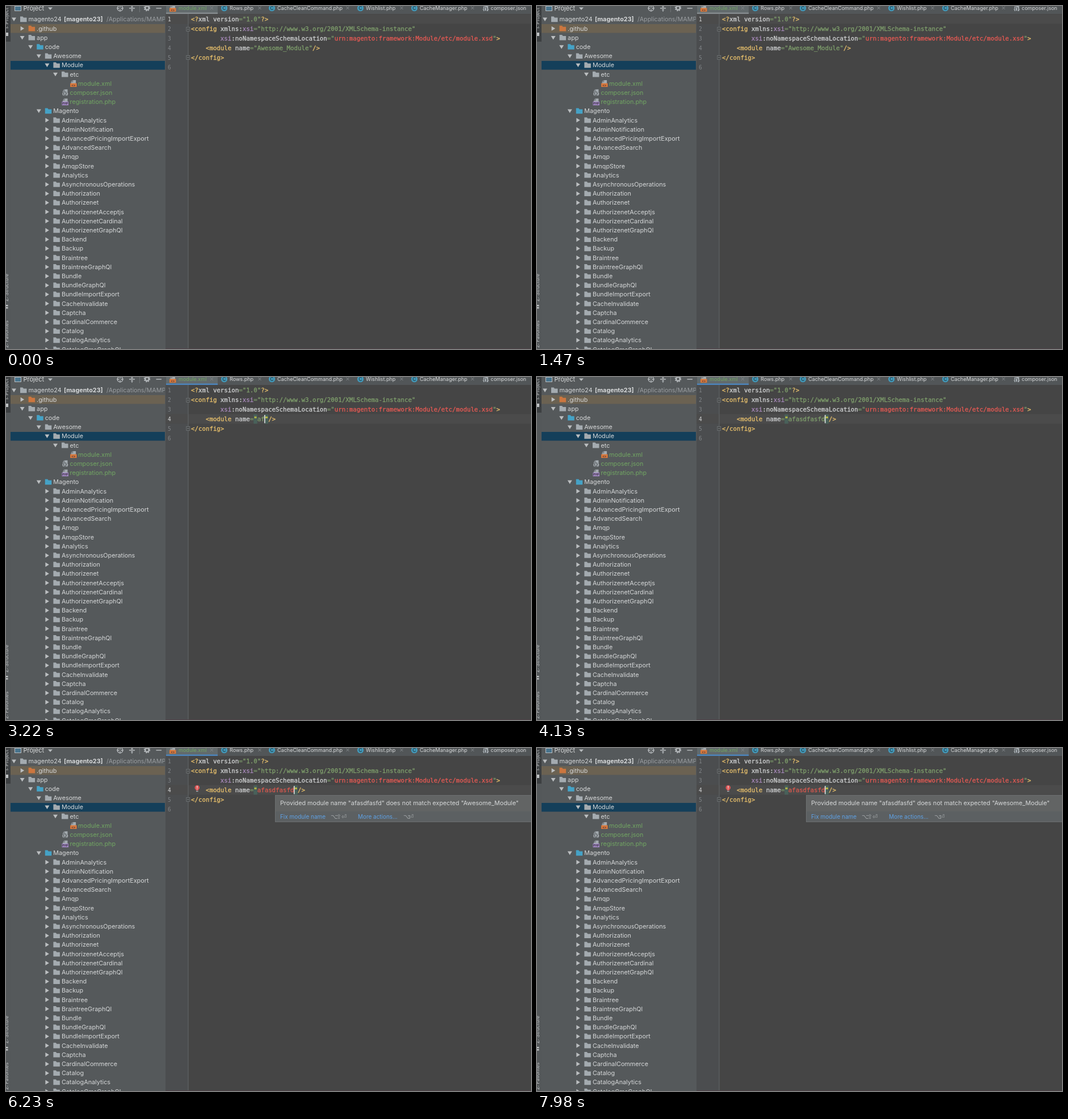
Animation, 925 px wide and 606 px high, one loop 8000 ms. Source, as an HTML page:

```html
<!DOCTYPE html>
<html lang="en">
<head>
<meta charset="utf-8">
<title>Module name inspection</title>
<style>
  html, body { margin: 0; width: 100%; height: 100%; overflow: hidden; background: #454545; }
  svg { display: block; width: 925px; height: 606px; }
  text { white-space: pre; font-family: Inter, "Open Sans", sans-serif; font-size: 10.8px; fill: #d6d8d9; }
  .code { font-family: "DejaVu Sans Mono", "Noto Sans Mono", monospace; font-size: 10.77px;
          fill: currentColor; stroke: currentColor; stroke-width: .3px; }
  .num { font-family: "DejaVu Sans Mono", monospace; font-size: 9.6px; fill: #7f8386; }
  .tab { font-size: 9.05px; }
  .side { font-size: 8.8px; fill: #c0c3c5; }
  .keys { font-family: "DejaVu Sans", sans-serif; font-size: 11px; fill: #a2a6a8; }
  .link { font-size: 9.95px; fill: #5fa2e6; }
</style>
</head>
<body>
<svg id="stage" viewBox="0 0 925 606"></svg>
<script>
const LOOP = 8000, SELECT = 1960, TYPE = 3080, KEY = 80, ERROR = 4410, POPUP = 5600;
const TYPED = 'afasdfasfd', NAME = 'Awesome_Module';
const COL = 6.483, LEFT = 326;
const C = { tag: '#e8c06c', attr: '#d0d2d3', ns: '#a88abb', str: '#7f9f6c', red: '#e75a54',
            match: '#f5e93a', gray: '#a4abb0', blue: '#45a2c6', orange: '#cb763f', green: '#72a763' };

const esc = s => s.replace(/&/g, '&amp;').replace(/</g, '&lt;');
const rect = (x, y, w, h, fill, more = '') => `<rect x="${x}" y="${y}" width="${w}" height="${h}" fill="${fill}" ${more}/>`;
const path = (d, fill, more = '') => `<path d="${d}" fill="${fill}" ${more}/>`;
const line = (d, color, width = 1) => path(d, 'none', `stroke="${color}" stroke-width="${width}"`);
const text = (x, y, s, more = '') => `<text x="${x}" y="${y}" ${more}>${esc(s)}</text>`;
const colX = col => LEFT + col * COL;
const lineY = n => 10 + n * 17;

// Each run is [text, colour], placed on the character grid.
function code(n, col, runs) {
  return runs.map(([s, color]) => {
    const out = text(colX(col), lineY(n), s, `class="code" style="color:${color}"`);
    col += s.length;
    return out;
  }).join('');
}

function folder(x, y, color) {
  return path(`M${x} ${y - 5}h4.5l1.5 2h5.5v7.6h-11.5z`, color);
}

function fileIcon(x, y, kind) {
  const page = path(`M${x + 4} ${y - 6}h6v11h-8.5v-8z`, '#a4abb0') + line(`M${x + 1.5} ${y - 3}h3v-3`, '#666b6e');
  if (kind === 'json')
    return page + text(x + 1.6, y + 4, '{}', 'style="font-size:8px;font-weight:700;fill:#44484a"')
      + line(`M${x + .5} ${y + 2}h2M${x + 9} ${y + 2}h2`, '#c5c9cc');
  const [color, label] = kind === 'xml' ? ['#d9783b', '<>'] : ['#a68ac9', 'PHP'];
  return page + rect(x, y - .5, 11.5, 6.5, color)
    + text(x + 5.7, y + 4.8, label, 'text-anchor="middle" style="font-size:5.2px;font-weight:700;fill:#3b3540"');
}

function arrow(x, y, open) {
  return path(open ? `M${x - 4} ${y - 3}h8l-4 6.5z` : `M${x - 3} ${y - 4}l6.5 4l-6.5 4z`, '#bbbec0');
}

function treeRow(i, depth, name, kind) {
  const y = 23.6 + i * 16.2, shift = depth * 14.6;
  const isFile = ['xml', 'json', 'php'].includes(kind);
  const open = kind !== 'closed' && name !== '.github';
  const color = { blue: C.blue, orange: C.orange }[kind] || C.gray;
  const icon = isFile ? fileIcon(25.5 + shift, y, kind) : folder(25 + shift, y, color);
  return (isFile ? '' : arrow(14 + shift, y, open)) + icon
    + text(39.5 + shift, y + 3.8, name, isFile ? `style="fill:${C.green}"` : '');
}

function sidebar() {
  const head = [[0, 'magento24'], [1, '.github', 'orange'], [1, 'app'], [2, 'code', 'blue'], [3, 'Awesome'],
    [4, 'Module'], [5, 'etc'], [6, 'module.xml', 'xml'], [5, 'composer.json', 'json'],
    [5, 'registration.php', 'php'], [3, 'Magento', 'blue']];
  const modules = ('AdminAnalytics AdminNotification AdvancedPricingImportExport AdvancedSearch Amqp AmqpStore '
    + 'Analytics AsynchronousOperations Authorization Authorizenet AuthorizenetAcceptjs AuthorizenetCardinal '
    + 'AuthorizenetGraphQl Backend Backup Braintree BraintreeGraphQl Bundle BundleGraphQl BundleImportExport '
    + 'CacheInvalidate Captcha CardinalCommerce Catalog CatalogAnalytics CatalogCmsGraphQl').split(' ');
  const rows = head.concat(modules.map(m => [4, m, 'closed']));
  return rect(0, 0, 281, 606, '#55595b')
    + rect(8, 32, 272, 15.5, '#6b6252') + rect(8, 97, 272, 15.5, '#143f5a')
    + rows.map(([depth, name, kind], i) => treeRow(i, depth, name, kind)).join('')
    + text(102, 27.4, '[magento23]', 'font-weight="700"')
    + text(177, 27.4, '/Applications/MAMP', 'clip-path="url(#tree)" style="fill:#9a9da0"');
}

function header() {
  const c = '#b9bdc0';
  return rect(15.5, -1, 11, 9.5, '#47738c', `stroke="${c}"`) + rect(15, -2, 12, 3, c)
    + text(30.5, 7.6, 'Project', 'style="font-size:11px"') + path('M74 2.5h8l-4 4.5z', c)
    + `<circle cx="201" cy="4" r="4.8" fill="none" stroke="${c}" stroke-width="1.3"/>`
    + line('M201-1v3.5M201 5.5v4M195.5 4h4M202.5 4h4', c, 1.3)
    + line('M217 4h10M222-1v3M222 6v4', c, 1.3) + path('M219.5 1h5l-2.5 2zM219.5 7.2h5l-2.5-2z', c)
    + line('M235.5 0v11', '#6e7274')
    + `<circle cx="248.5" cy="3.5" r="3.3" fill="none" stroke="${c}" stroke-width="2.2"/>`
    + `<circle cx="248.5" cy="3.5" r="4.9" fill="none" stroke="${c}" stroke-width="1.6" stroke-dasharray="2 1.85"/>`
    + line('M264.5 4h9.5', c, 1.4);
}

function toolStrip() {
  const label = (y, s) => text(0, 0, s, `class="side" transform="translate(4 ${y}) rotate(-90)"`);
  return rect(0, 0, 8, 606, '#54585a') + rect(0, 0, 8, 63, '#3d4042')
    + label(41, '1: Project') + rect(0, 47, 4, 6, '#bfc2c4')
    + label(522, 'Z: Structure') + rect(0, 528, 3.5, 2.5, '#bfc2c4') + rect(0, 532, 3.5, 2.5, '#bfc2c4')
    + label(604, '2: Favorites');
}

function tabs() {
  const list = [[394, 'Rows.php', 447], [478, 'CacheCleanCommand.php', 602], [634, 'Wishlist.php', 697], [729, 'CacheManager.php', 822]];
  const cross = x => line(`M${x - 2.5} 1l5 5m0-5l-5 5`, '#858a8d');
  return rect(281, 0, 644, 14, '#525658') + rect(282, 0, 91, 14, '#626a6c')
    + rect(282, 11.5, 91, 2.5, '#858b8e', 'id="underline"')
    + fileIcon(288, 4, 'xml') + text(304, 6.8, 'module.xml', `class="tab" style="fill:${C.green}"`) + cross(362.5)
    + list.map(([x, name, close]) => `<circle cx="${x - 9.5}" cy="3.7" r="5.6" fill="#4299ba"/>`
      + text(x - 9.5, 6.9, 'C', 'text-anchor="middle" style="font-size:8.5px;font-weight:600;fill:#27434f"')
      + text(x, 6.8, name, 'class="tab"') + cross(close)).join('')
    + fileIcon(839.5, 4, 'json') + text(854, 6.8, 'composer.json', 'class="tab"');
}

function editor() {
  const fold = y => rect(317.8, y - 3.5, 6, 7, '#484a4b', 'stroke="#74787a" stroke-width=".8"') + line(`M319.3 ${y}h3`, '#8c9092', .9);
  const nums = [1, 2, 3, 4, 5, 6].map(n => text(285, lineY(n), String(n), `class="num" id="num${n}"`)).join('');
  return rect(281, 14, 644, 592, '#454545') + rect(281, 14, 40, 592, '#4b4d4f')
    + rect(281, 0, 644, 17, '#4b4b4b', 'id="current"')
    + line('M321 14v592', '#65686a') + fold(41) + fold(91) + nums
    + code(1, 0, [['<?', C.tag], ['xml version', C.attr], ['="1.0"', C.str], ['?>', C.tag]])
    + code(2, 0, [['<config ', C.tag], ['xmlns:', C.attr], ['xsi', C.ns], ['="http://www.w3.org/2001/XMLSchema-instance"', C.str]])
    + code(3, 8, [['xsi', C.ns], [':noNamespaceSchemaLocation', C.attr], ['="', C.str],
        ['urn:magento:framework:Module/etc/module.xsd', C.red], ['"', C.str], ['>', C.tag]])
    + rect(colX(18), 66, NAME.length * COL, 16.5, '#2f62ad', 'id="selection"')
    + `<g id="match">${rect(colX(17), 66, COL, 16.5, '#49615a')}${rect(0, 66, COL, 16.5, '#49615a', 'id="matchEnd"')}</g>`
    + code(4, 4, [['<module ', C.tag], ['name', C.attr], ['=', C.str]])
    + text(colX(17), lineY(4), '"', 'class="code" id="quote"') + text(colX(18), lineY(4), '', 'class="code" id="value"')
    + text(0, lineY(4), '"', 'class="code" id="quoteEnd"') + text(0, lineY(4), '/>', `class="code" id="close" style="color:${C.tag}"`)
    + code(5, 0, [['</config>', C.tag]])
    + rect(0, 67, 1.6, 14.5, '#e4e4e4', 'id="caret"')
    + `<g id="bulb"><circle cx="336.8" cy="70" r="4.3" fill="#dc5757"/>${rect(334.8, 73, 4, 2, '#dc5757')}`
    + `${rect(335, 75.8, 3.6, 1.3, '#b9bcbe')}${line('M336.8 67v3.8M336.8 71.8v1.3', '#f3e2e2', 1.3)}</g>`
    + rect(281, 605, 644, 1, '#4f4147');
}

function popup() {
  const keys = list => list.map(([x, s]) => text(x, 125, s, 'class="keys"')).join('');
  return `<g id="popup">${rect(474.5, 83.5, 455, 47, '#626464', 'stroke="#6c6f70"')}${rect(475, 112, 450, 18, '#5c6062')}`
    + text(483, 101.3, `Provided module name "${TYPED}" does not match expected "${NAME}"`, 'style="font-size:10.76px"')
    + text(483, 125, 'Fix module name', 'class="link"') + keys([[572, '⌥'], [582, '⇧'], [591, '⏎']])
    + text(620, 125, 'More actions...', 'class="link"') + keys([[700, '⌥'], [709, '⏎']]) + '</g>';
}

const stage = document.getElementById('stage');
stage.innerHTML = '<clipPath id="tree"><rect x="0" y="0" width="280" height="606"/></clipPath>'
  + sidebar() + header() + toolStrip() + editor() + tabs() + popup();

const el = {};
stage.querySelectorAll('[id]').forEach(node => el[node.id] = node);
const show = (node, on) => node.setAttribute('visibility', on ? 'visible' : 'hidden');

function draw(t) {
  const focused = t >= SELECT, typing = t >= TYPE, failed = t >= ERROR;
  const count = Math.min(TYPED.length, Math.floor((t - TYPE) / KEY) + 1);
  const value = typing ? TYPED.slice(0, count) : NAME;
  const end = colX(18 + value.length);
  const typedAll = TYPE + KEY * (TYPED.length - 1);
  const blinkStart = typing ? typedAll : SELECT;

  el.current.setAttribute('y', focused ? 65.5 : 14.5);
  el.num1.style.fill = focused ? '' : '#d5d6d7';
  el.num4.style.fill = focused ? '#d5d6d7' : '';
  el.underline.setAttribute('fill', focused ? '#4c84bb' : '#858b8e');
  show(el.selection, focused && !typing);
  show(el.match, typing);
  el.matchEnd.setAttribute('x', end);
  el.value.textContent = value;
  el.value.style.color = failed ? '#d9594f' : C.str;
  el.quote.style.color = el.quoteEnd.style.color = typing ? C.match : C.str;
  el.quoteEnd.setAttribute('x', end);
  el.close.setAttribute('x', end + COL);
  el.caret.setAttribute('x', end - .6);
  show(el.caret, focused && (t < blinkStart || (t - blinkStart) % 1000 < 500));
  show(el.bulb, failed);
  show(el.popup, t >= POPUP);
}

const start = performance.now();
function tick() {
  draw((performance.now() - start) % LOOP);
  requestAnimationFrame(tick);
}
tick();
</script>
</body>
</html>
```
